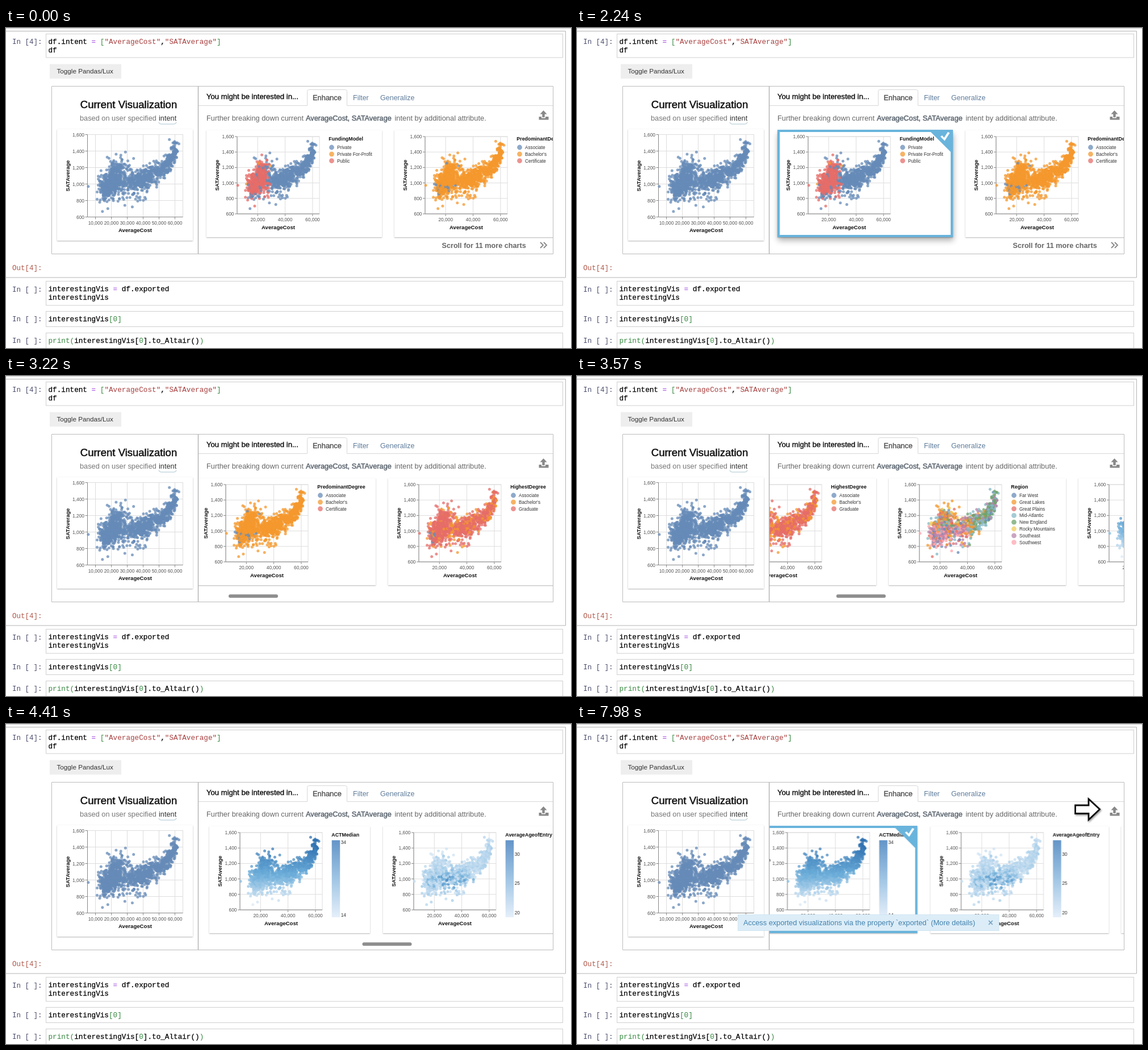
These frames come from a looping animation (995 by 563 pixels, 8 s). An HTML page with a canvas:

```html
<!DOCTYPE html>
<html lang="en">
<head>
<meta charset="utf-8">
<title>Notebook chart export</title>
<style>
  html, body { margin: 0; width: 100%; height: 100%; overflow: hidden; background: #fff; }
  #stage { position: relative; width: 995px; height: 563px; overflow: hidden; background: #fff; }
  #stage svg, #stage canvas { position: absolute; left: 0; top: 0; overflow: visible; }
  text { font-family: "Liberation Sans", Arial, sans-serif; white-space: pre; }
  text.mono { font-family: "Liberation Mono", monospace; }
  #view { position: absolute; left: 339px; top: 170px; width: 624px; height: 226px; overflow: hidden; }
  #strip { position: absolute; left: 0; top: 0; will-change: transform; }
  .card { position: absolute; height: 188px; background: #fff; box-shadow: 0 1px 2px rgba(0,0,0,.3); }
  .mark { position: absolute; inset: -1px 0 0 0; border: 4px solid #69b4dc; }
</style>
</head>
<body>
<div id="stage">
  <svg id="page" width="995" height="563"></svg>
  <div id="view"><div id="strip"></div></div>
  <svg id="over" width="995" height="563"></svg>
</div>
<script>
const $ = id => document.getElementById(id);
const LOOP = 8000, STEP = 70;
const COLORS = ['#678bb8', '#f4982e', '#e66d69', '#85b9c5', '#6fa36c', '#f2cc58', '#b885ab', '#ffa4ae'];

// ---------- drawing helpers ----------
function text(x, y, s, size = 12.77, o = {}) {
  const fill = o.fill || '#333';
  return `<text x="${x}" y="${y}" font-size="${size}" fill="${fill}"` +
    ` font-weight="${o.bold ? 700 : 400}" text-anchor="${o.anchor || 'start'}"` +
    `${o.medium ? ` stroke="${fill}" stroke-width="${o.medium}"` : ''}` +
    `${o.mono ? ' class="mono"' : ''}${o.more || ''}>${s}</text>`;
}
const rect = (x, y, w, h, fill, stroke = 'none', more = '') =>
  `<rect x="${x}" y="${y}" width="${w}" height="${h}" fill="${fill}" stroke="${stroke}" ${more}/>`;
const path = (d, stroke, width = 1, fill = 'none') =>
  `<path d="${d}" stroke="${stroke}" stroke-width="${width}" fill="${fill}"/>`;
const code = (y, s) => text(74.5, y, s, 12.68, { mono: true, fill: '#000', medium: .25 });
const prompt = (y, s, fill = '#4a4c6c') => text(11, y, s, 12.5, { mono: true, fill });
const paint = (color, s) => `<tspan fill="${color}" stroke="none">${s}</tspan>`;
const green = s => paint('#35883f', s), red = s => paint('#a8403f', s), purple = s => paint('#a040e0', s);

// ---------- data ----------
function random(seed) {
  return () => {
    seed = seed + 0x6D2B79F5 | 0;
    let t = Math.imul(seed ^ seed >>> 15, 1 | seed);
    t = t + Math.imul(t ^ t >>> 7, 61 | t) ^ t;
    return ((t ^ t >>> 14) >>> 0) / 4294967296;
  };
}
const clamp = (v, lo = 0, hi = 1) => Math.min(hi, Math.max(lo, v));

const points = (() => {
  const r = random(11), out = [];
  const g = () => Math.sqrt(-2 * Math.log(1 - r())) * Math.cos(6.2832 * r());
  const add = (n, make) => { for (let i = 0; i < n; i++) out.push(make()); };
  add(560, () => { const k = g(); return [19800 + 3500 * k, 1005 + 38 * k + 74 * g()]; });
  add(80, () => [23500 + 3600 * g(), 1150 + 85 * Math.abs(g())]);
  add(510, () => {
    const x = 38500 + 7200 * g();
    return [x, 1025 + 170 * (Math.max(0, x - 30000) / 22000) ** 2 + 60 * g()];
  });
  add(230, () => {
    const u = r() ** .6;
    return [46000 + 14500 * u + 900 * g(), 1120 + 290 * u ** 1.8 + 65 * g()];
  });
  add(28, () => [13000 + 30000 * r(), 790 + 110 * r()]);
  const spread = out.map(([x, y]) => [x < 10000 ? 24000 - x : Math.min(x, 62500), y < 770 ? 1750 - y : Math.min(y, 1500)]);
  return spread.concat([[5500, 970], [14400, 668], [17800, 702], [33200, 722], [28500, 742],
    [23000, 1362], [26000, 1350], [34000, 1310], [56500, 1540], [59800, 1515], [61500, 1500]]);
})();

const STOPS = [[219, 233, 246], [108, 173, 217], [50, 115, 178]];
function blues(v) {
  const i = v < .5 ? 0 : 1, k = clamp(v) * 2 - i;
  return `rgb(${STOPS[i].map((c, j) => Math.round(c + (STOPS[i + 1][j] - c) * k))})`;
}

const shade = {
  plain: () => COLORS[0],
  funding: (x, y, r) => r < .004 ? COLORS[1] :
    COLORS[x < 27000 + 7000 * (r - .5) && (y > 860 || r > .6) && r > .06 ? 2 : 0],
  predominant: (x, y, r) => COLORS[y < 990 && x < 29000 && r < .13 || r < .004 ? 0 : 1],
  highest: (x, y, r) => COLORS[x < 17000 && y < 980 && r < .2 ? 0 : r > (x > 27000 ? .72 : .88) ? 1 : 2],
  region: (x, y, r) => {
    const mix = x > 53000 ? '44443306' : x > 41000 ? '33344161' : y > 1060 ? '110136245' : '666772130';
    return COLORS[mix[Math.floor(r * mix.length)]];
  },
  act: (x, y, r) => blues((y - 690) / 740 + .1 * (r - .5)),
  age: (x, y, r) => blues(.04 + .2 * r +
    .8 * r * r * Math.exp(-(((x - 33000) / 16000) ** 2) - ((y - 975) / 110) ** 2))
};

// ---------- charts ----------
function axes(b) {
  const sx = v => b.x + (v - 5000) / 60000 * b.w, sy = v => b.y + (1600 - v) / 1000 * b.h;
  const bottom = b.y + b.h;
  let s = rect(b.x, b.y, b.w, b.h, 'none', '#ddd'), labels = '';
  for (let v = b.xStep; v <= 60000; v += b.xStep) {
    s += path(`M${sx(v)},${b.y}V${bottom}`, '#ddd') + path(`M${sx(v)},${bottom}v4`, '#888');
    labels += text(sx(v), bottom + 13.3, v.toLocaleString('en-US'), 8.4, { anchor: 'middle', fill: '#555' });
  }
  for (let v = 600; v <= 1600; v += 200) {
    s += path(`M${b.x},${sy(v)}h${b.w}`, '#ddd') + path(`M${b.x},${sy(v)}h-4`, '#888');
    labels += text(b.x - 5.5, sy(v) + 3, v.toLocaleString('en-US'), 8.4, { anchor: 'end', fill: '#555' });
  }
  const cy = b.y + b.h / 2, tx = b.x - b.titleGap;
  return s + path(`M${b.x},${b.y}V${bottom}h${b.w}`, '#888') + labels +
    text(b.x + b.w / 2, bottom + 26.7, 'AverageCost', 9.65, { bold: 1, anchor: 'middle', fill: '#111' }) +
    text(tx, cy, 'SATAverage', 9.5, { bold: 1, anchor: 'middle', fill: '#111', more: ` transform="rotate(-90 ${tx} ${cy})"` });
}

function dots(b, color, width, height) {
  const canvas = document.createElement('canvas'), scale = window.devicePixelRatio || 1;
  canvas.width = width * scale; canvas.height = height * scale;
  canvas.style.cssText = `width:${width}px;height:${height}px`;
  const c = canvas.getContext('2d'), r = random(5);
  c.scale(scale, scale);
  c.globalAlpha = .76;
  for (const [x, y] of points) {
    c.fillStyle = color(x, y, r());
    c.beginPath();
    c.arc(b.x + (x - 5000) / 60000 * b.w, b.y + (1600 - y) / 1000 * b.h, 2.5, 0, 7);
    c.fill();
  }
  return canvas;
}

const legendTitle = s => text(215.3, 18, s, 8.9, { bold: 1, fill: '#111' });
const legend = (title, names) => legendTitle(title) + names.map((n, i) =>
  `<circle cx="220.5" cy="${30 + 11.8 * i}" r="4.4" fill="${COLORS[i]}" opacity=".74"/>` +
  text(230, 33 + 11.8 * i, n, 8.2)).join('');
const ramp = (title, marks) => legendTitle(title) + rect(215.7, 24.5, 14.5, 135.5, 'url(#ramp)') +
  marks.map(([n, y]) => text(231.7, y, n, 8.4)).join('');

const cards = [
  [353, 309, shade.funding, legend('FundingModel', ['Private', 'Private For-Profit', 'Public'])],
  [684, 317.5, shade.predominant, legend('PredominantDegree', ['Associate', "Bachelor's", 'Certificate'])],
  [1023.5, 295.5, shade.highest, legend('HighestDegree', ['Associate', "Bachelor's", 'Graduate'])],
  [1340.5, 312.5, shade.region, legend('Region', ['Far West', 'Great Lakes', 'Great Plains', 'Mid-Atlantic',
    'New England', 'Rocky Mountains', 'Southeast', 'Southwest'])],
  [1675, 283, shade.act, ramp('ACTMedian', [[34, 31], [14, 159]])],
  [1980.5, 314, shade.age, ramp('AverageAgeofEntry', [[30, 51.5], [25, 103], [20, 154.5]])],
  [2316.5, 300]
].map(([left, width, color, key]) => {
  const el = document.createElement('div'), box = { x: 54, y: 11, w: 145, h: 136, xStep: 20000, titleGap: 32 };
  el.className = 'card';
  el.style.cssText = `left:${left - 339}px;top:10px;width:${width}px`;
  if (color) {
    el.innerHTML = `<svg width="${width}" height="188">${axes(box)}${key}</svg>`;
    el.append(dots(box, color, 210, 165));
  }
  const mark = document.createElement('div');
  mark.className = 'mark';
  mark.innerHTML = `<svg width="1" height="1"><g transform="translate(${width - 8},0)">` +
    path('M-36,-1H1V36Z', 'none', 0, '#69b4dc') +
    path('M-18,8 L-15,6 -11.5,10 -5,0 -1.5,1.5 -10.5,15.5 Z', 'none', 0, '#fff') + '</g></svg>';
  el.append(mark);
  $('strip').append(el);
  return { el, mark };
});

// ---------- page ----------
const mainBox = { x: 143.5, y: 187.5, w: 168, h: 145, xStep: 10000, titleGap: 32 };
const cell = (y, h) => rect(70.5, y, 910, h, '#fff', '#cfcfcf');
$('page').innerHTML =
  `<defs><linearGradient id="ramp" x1="0" y1="0" x2="0" y2="1"><stop stop-color="#6495c8"/>
   <stop offset=".5" stop-color="#a0c5e4"/><stop offset="1" stop-color="#e5effa"/></linearGradient>
   <filter id="soft" x="-20%" y="-20%" width="150%" height="150%">
   <feDropShadow dx="1.5" dy="2" stdDeviation="1.5" flood-opacity=".4"/></filter></defs>` +
  path('M0,.5H995', '#ccc') + path('M0,5.5H985.5V439H0', '#b4b4b4') +
  cell(10.5, 41.5) + cell(445.5, 42.5) + cell(498.5, 27) + cell(536.5, 42) +
  prompt(28, 'In [4]:') + prompt(425.5, 'Out[4]:', '#b0584a') +
  [463.5, 516, 554].map(y => prompt(y, 'In [ ]:')).join('') +
  code(27.5, `df.intent ${purple('=')} ${green('[')}${red('"AverageCost"')},${red('"SATAverage"')}${green(']')}`) +
  code(43, 'df') +
  code(462.5, `interestingVis ${purple('=')} df.exported`) + code(478, 'interestingVis') +
  code(516, `interestingVis${green('[0]')}`) +
  code(554, `${green('print(')}interestingVis[${green('0')}].to_Altair()${green(')')}`) +
  rect(77, 63.5, 126, 25.5, '#eee') + text(89.5, 80, 'Toggle Pandas/Lux', 11.7) +
  text(216, 140.5, 'Current Visualization', 18.5, { medium: .5, anchor: 'middle', fill: '#111' }) +
  text(130, 162.5, 'based on user specified', 12.77, { fill: '#777' }) + text(269, 162.5, 'intent') +
  path('M269,165.5q.5,3.5 4,3.5h23q3.5,0 4,-3.5', '#a9c6cf') +
  rect(90, 178, 239, 196, '#fff', 'none', 'style="filter:drop-shadow(0 1px 1px rgba(0,0,0,.3))"') +
  axes(mainBox) + `<foreignObject id="plot" x="0" y="0" width="340" height="400"></foreignObject>` +
  text(353, 124.5, 'You might be interested in...', 13.1, { medium: .4, fill: '#111' }) +
  path('M339,136.5H530.5V111.5q0,-3 3,-3h64q3,0 3,3V136.5H964', '#d8d8d8') +
  text(540, 127, 'Enhance', 12.9, { medium: .4, fill: '#555' }) +
  text(611, 127, 'Filter', 12.5, { fill: '#5f7d9c' }) + text(659, 127, 'Generalize', 12.5, { fill: '#5f7d9c' }) +
  text(353, 162.5, 'Further breaking down current', 12.77, { fill: '#666' }) +
  text(528, 162.5, 'AverageCost, SATAverage', 12.77, { medium: .5, fill: '#5c6670' }) +
  text(684.5, 162.5, 'intent by additional attribute.', 12.9, { fill: '#666' }) +
  path('M946.5,145L952.5,151.5H948.7V157H944.3V151.5H940.5Z', 'none', 0, '#888') +
  path('M938.5,156H943V158.5H950V156H955.5V161.5H938.5Z', 'none', 0, '#888');
$('plot').append(dots(mainBox, shade.plain, 340, 400));

$('over').innerHTML =
  path('M80.5,102.5H963.5V397.5H80.5Z', '#bcbcbc') + path('M338.5,102.5V397.5', '#b4b4b4', 1.5) +
  '<g id="more">' + text(767.5, 387, 'Scroll for 11 more charts', 12.65, { bold: 1, fill: '#666' }) +
  path('M941,377l5,5l-5,5M947,377l5,5l-5,5', '#888', 1.8) + '</g>' +
  rect(0, 384.3, 87, 6, '#8e8e8e', 'none', 'rx="3" id="bar"') +
  '<g id="arrow" filter="url(#soft)"><path d="M877.5,143H901V132L920.5,150L901,168.5V157.5H877.5Z"' +
  ' fill="#fff" stroke="#111" stroke-width="2.8"/></g>' +
  '<g id="toast">' + rect(283.5, 335.5, 459.5, 28, '#dcedf8', '#d0e4f0') +
  text(293, 354, 'Access exported visualizations via the property `exported` (More details)', 12.75, { fill: '#4181ad' }) +
  text(728.5, 355, '×', 16, { bold: 1, anchor: 'middle', fill: '#7ba7c6' }) + '</g>';

// ---------- timeline: [ms, value] ----------
const TRACKS = {
  scroll: [[2730, 0], [2940, 70], [3220, 351], [3570, 792], [3920, 1180], [4200, 1300], [4410, 1317], [4760, 1358.5]],
  barX: [[2730, 340], [3220, 392], [3570, 456.7], [4410, 627.5]],
  barFade: [[2730, 0], [2800, 1], [4760, 1], [5040, 0]],
  hoverFirst: [[770, 0], [980, 1], [2800, 1], [3000, 0]],
  hoverFifth: [[4900, 0], [5180, 1], [6440, 1], [6650, 0]],
  arrow: [[6580, 0], [6790, 1]],
  toast: [[7280, 0], [7350, 1]]
};
const PICK_FIRST = 1190, PICK_FIFTH = 6160;

function at(track, t) {
  const i = track.findIndex(([ms]) => ms > t);
  if (i === 0) return track[0][1];
  if (i < 0) return track[track.length - 1][1];
  const [t0, a] = track[i - 1], [t1, b] = track[i];
  return a + (b - a) * (t - t0) / (t1 - t0);
}

const lift = (x, y, blur, alpha, k) =>
  `0 1px 2px rgba(0,0,0,.3), ${x * k}px ${y * k}px ${blur}px rgba(0,0,0,${alpha * k})`;

function render(t) {
  const v = {};
  for (const name in TRACKS) v[name] = at(TRACKS[name], t);
  $('strip').style.transform = `translateX(${-v.scroll}px)`;
  $('bar').setAttribute('x', v.barX);
  $('bar').style.opacity = v.barFade;
  $('more').style.visibility = v.scroll > 0 ? 'hidden' : 'visible';
  $('arrow').style.opacity = v.arrow;
  $('toast').style.opacity = v.toast;
  cards[0].el.style.boxShadow = lift(1, 6, 10, .3, v.hoverFirst);
  cards[4].el.style.boxShadow = lift(6, 14, 12, .42, v.hoverFifth);
  cards.forEach(({ mark }, i) => {
    const on = i === 0 && t >= PICK_FIRST || i === 4 && t >= PICK_FIFTH;
    mark.style.display = on ? 'block' : 'none';
  });
}

const start = performance.now();
function tick() {
  const t = (performance.now() - start) % LOOP;
  render(Math.floor(t / STEP) * STEP);
  requestAnimationFrame(tick);
}
tick();
</script>
</body>
</html>
```
